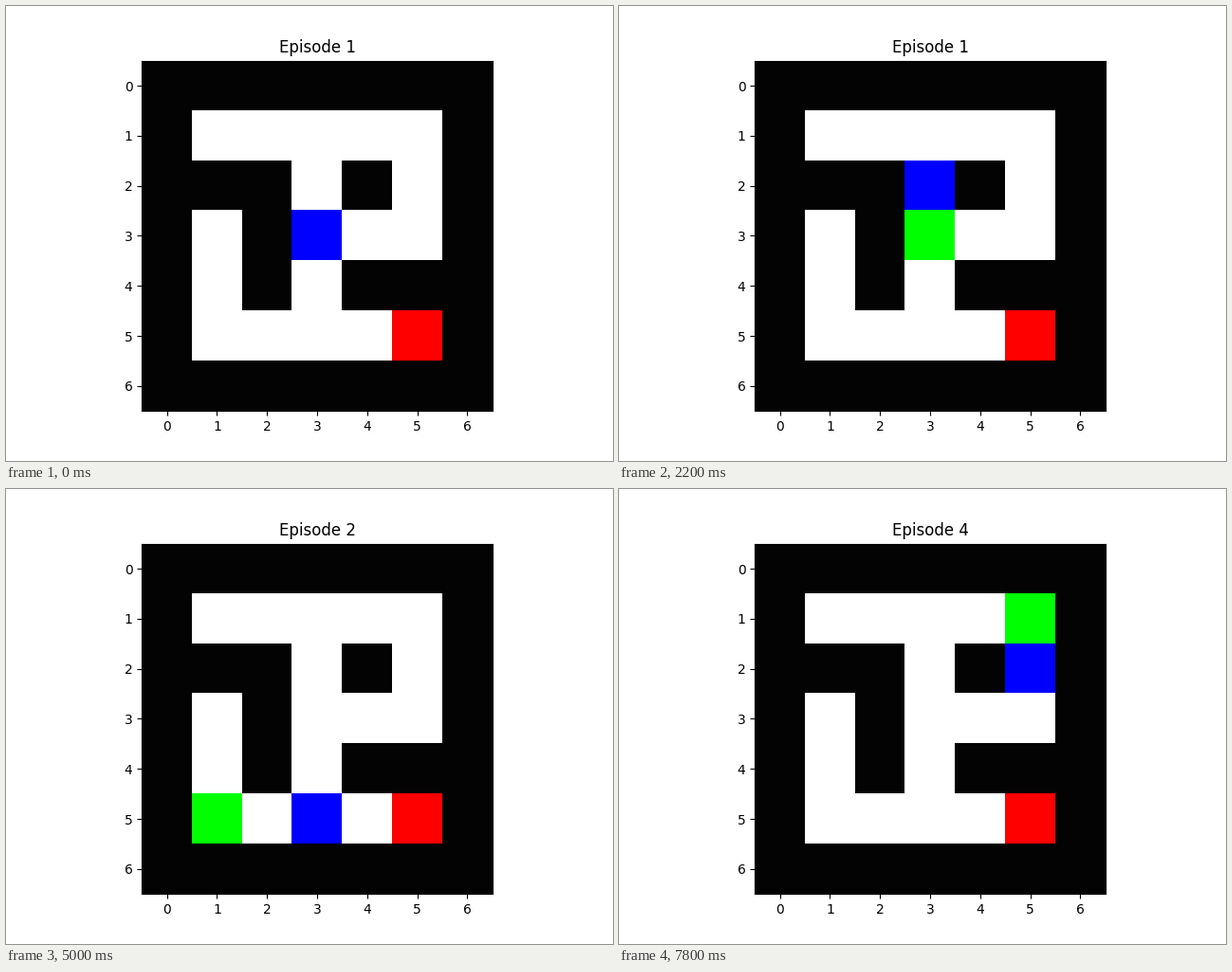
A matplotlib script for the animation above (8000 ms loop, 640 px wide and 480 px high).

```python
import numpy as np
import matplotlib.pyplot as plt
from matplotlib.animation import FuncAnimation

MAZE = [
    "#######",
    "#.....#",
    "###.#.#",
    "#.#...#",
    "#.#.###",
    "#.....#",
    "#######",
]
GOAL = (5, 5)
WALL, FLOOR = 3, 255
RED, GREEN, BLUE = (255, 0, 0), (0, 255, 0), (0, 0, 255)
STEPS = {"U": (-1, 0), "D": (1, 0), "L": (0, -1), "R": (0, 1)}

# (start cell, moves) for each episode
EPISODES = [
    ((3, 3), "RRLRUDLLUDUDUDDDRLRL"),
    ((5, 1), "RLRRRLRR"),
    ((4, 3), "DUDUDRR"),
    ((1, 5), "D"),
]


def walk(start, moves):
    """Yield every cell the agent stands on, the start included."""
    row, col = start
    yield row, col
    for move in moves:
        dr, dc = STEPS[move]
        row, col = row + dr, col + dc
        yield row, col


states = [(number, start, cell)
          for number, (start, moves) in enumerate(EPISODES, 1)
          for cell in walk(start, moves)]

shade = np.array([[WALL if ch == "#" else FLOOR for ch in line]
                  for line in MAZE], dtype=np.uint8)
base = np.repeat(shade[:, :, None], 3, axis=2)


def paint(start, agent):
    grid = base.copy()
    grid[start] = GREEN
    grid[GOAL] = RED
    grid[agent] = BLUE
    return grid


fig, ax = plt.subplots(figsize=(6.4, 4.8), dpi=100)
image = ax.imshow(base, interpolation="nearest")
title = ax.set_title("")
ax.set_xticks(range(7))
ax.set_yticks(range(7))


def update(i):
    number, start, agent = states[i]
    image.set_data(paint(start, agent))
    title.set_text(f"Episode {number}")
    return image, title


anim = FuncAnimation(fig, update, frames=len(states), interval=200,
                     repeat=True, repeat_delay=0, blit=False)
plt.show()
```
